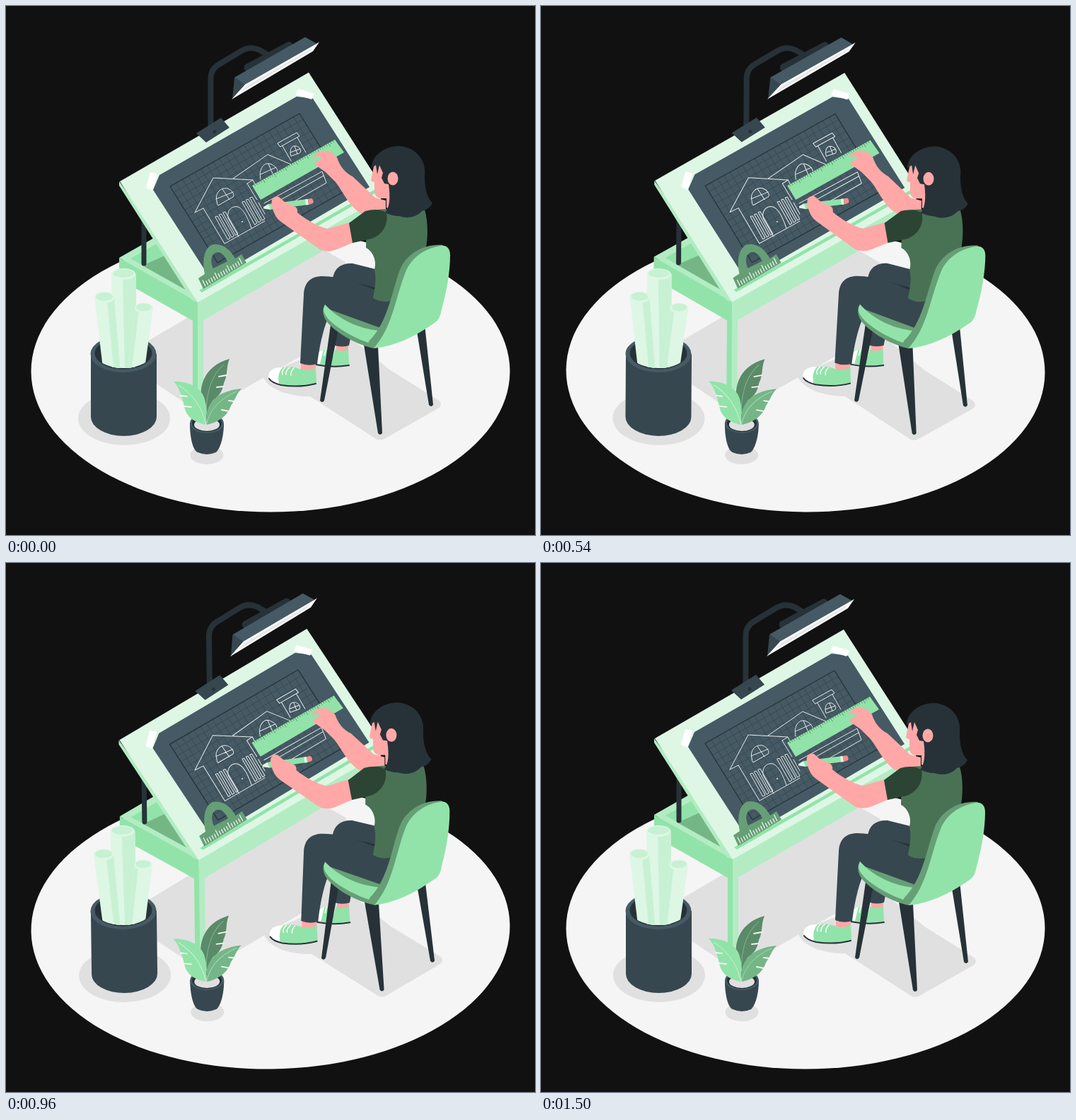
An HTML page with a canvas for the animation above (1.54 s loop, 748 px wide and 748 px high).

```html
<!DOCTYPE html>
<html lang="en">
<head>
<meta charset="utf-8">
<title>Architect at the drawing table</title>
<style>
html, body { margin: 0; width: 100%; height: 100%; overflow: hidden; background: #111; }
canvas { display: block; width: 100vw; height: 100vh; }
</style>
</head>
<body>
<canvas id="stage" width="748" height="748"></canvas>
<script>
const ctx = document.getElementById('stage').getContext('2d');
const LOOP = 1540, PERIOD = 1500, LEAD = 35;
const GREEN = '#92e3a9', PALE = '#def7e5', SOFT = '#b3ecc3', MINT = '#c8f1d4', MOSS = '#669f76', LEAF = '#75b687';
const INK = '#263238', SLATE = '#37474f', STEEL = '#455a64';
const FLOOR = '#f5f5f5', SHADE = '#e0e0e0', SKIN = '#ffa8a7', SHIRT = '#497255', SLEEVE = '#2c4433';

function fill(color, d) {
  ctx.fillStyle = color;
  ctx.fill(new Path2D(d), 'evenodd');
}

function line(color, width, d) {
  ctx.strokeStyle = color;
  ctx.lineWidth = width;
  ctx.stroke(new Path2D(d));
}

function oval(color, x, y, rx, ry) {
  ctx.fillStyle = color;
  ctx.beginPath();
  ctx.ellipse(x, y, rx, ry, 0, 0, 7);
  ctx.fill();
}

function sway(cx, cy, angle, draw) {
  ctx.save();
  ctx.translate(cx, cy);
  ctx.rotate(angle);
  ctx.translate(-cx, -cy);
  draw();
  ctx.restore();
}

// Rocks 0 -> 1 -> -1 -> 0 degrees at constant speed.
function wind(ms) {
  const q = (ms % PERIOD) / (PERIOD / 4);
  return q < 1 ? q : q < 3 ? 2 - q : q - 4;
}

function lamp() {
  line(INK, 8, 'M289.5 172V103Q289.5 89 302 82L332 64Q345 56 358 62L370 69');
  line(INK, 11, 'M342 87L400 56');
  fill(STEEL, 'M323 101L423 44L439 53L338 112Z');
  fill(SLATE, 'M323 101L338 111L320 132Z');
  fill('#fff', 'M338 111L443 51L434 64L319 132Z');
  fill('#e6e6e6', 'M340 113L434 59L428 65L330 123Z');
  fill(SLATE, 'M269 180L304 158L316 172L283 193Z');
  oval(INK, 295, 178, 2.4, 2.4);
}

function sheet() {
  fill(STEEL, 'M217 239L411 128L434 131L514 256L290 387L208 260Z');
  fill('#fff', 'M413 117L436 124L432 132L409 125Z');
  fill('#fff', 'M204 235L214 237L207 261L198 257Z');
  const at = (u, v) => `${232 + 183 * u + 67 * v} ${255 - 103 * u + 108 * v}`;
  let grid = '';
  for (let i = 1; i < 21; i++) grid += `M${at(i / 21, 0)}L${at(i / 21, 1)}`;
  for (let i = 1; i < 13; i++) grid += `M${at(0, i / 13)}L${at(1, i / 13)}`;
  line('#37474f', 0.8, grid);
  line(INK, 1.3, `M${at(0, 0)}L${at(1, 0)}L${at(1, 1)}L${at(0, 1)}Z`);
}

function house() {
  const chalk = d => line('#e6eaec', 1, d);
  chalk('M267 292L293 243L349 246L341 251M267 292L279 286M279 286L309 336L366 304M341 251L355 274');
  chalk('M321 244L370 210L408 226M349 246L361 270');
  // Round window, door and shutters
  chalk('M298 276C295 264 304 256 313 258C320 260 324 268 321 270L300 282Q298 280 298 276M306 259L316 274M297 273L321 263');
  chalk('M329 326L314 300C312 288 320 282 328 284C334 286 341 296 347 314');
  oval('#e6eaec', 334, 305, 1, 1);
  for (let i = 0; i < 3; i++) {
    const x = 296 + 5.5 * i, y = 298 - 3 * i;
    chalk(`M${x} ${y}l3 -1l18 31l-3 2Z`);
    chalk(`M${x + 38} ${y - 21}l3 -1l18 31l-3 2Z`);
  }
  // Rear wing
  chalk('M360 245C357 231 364 221 373 223C379 225 383 229 384 233M371 223L377 237M360 238L382 228');
  chalk('M384 194L411 179L415 184L388 199ZM391 198L403 219M412 186L424 207');
  chalk('M403 212C400 203 404 197 410 198C416 199 419 207 415 208ZM408 198L412 209M402 207L416 202');
  chalk('M357 278L366 294M365 279L447 234L453 250L387 288M369 285L449 240');
}

function ruler() {
  fill(GREEN, 'M348 254L465 189L478 207L360 274Z');
  let ticks = '';
  for (let i = 1; i < 38; i++) {
    const u = i / 38, size = i % 5 ? 2.5 : 5;
    ticks += `M${348 + 117 * u} ${254 - 65 * u}l${size * .55} ${size * .85}`;
  }
  line('#49805a', 0.8, ticks);
}

function protractor() {
  fill(MOSS, 'M272 385L281 379C276 354 283 337 296 337C309 337 318 346 324 357L333 351L340 363L279 400ZM293 371L313 361C309 351 302 346 296 349C289 353 289 362 293 371Z');
  let ticks = '';
  for (let i = 0; i < 16; i++) {
    const size = i % 5 ? 5 : 8;
    ticks += `M${282 + 3.45 * i} ${396 - 2.1 * i}l${-size * .5} ${-size}`;
  }
  line('#fff', 1.1, ticks);
}

function table() {
  fill(SHADE, 'M166 503Q163 497 171 491L263 437L450 345L480 362V459L285 571Q276 576 266 570Z');
  fill(GREEN, 'M264 430H272V546L264 541Z');
  fill(SOFT, 'M271 430H279V540L271 546Z');
  fill(SOFT, 'M160 356L225 319L300 400L271 420Z');
  fill(GREEN, 'M176 357L222 331L264 407Z');
  fill(LEAF, 'M193 367L238 347L266 408Z');
  line(INK, 7, 'M195 300V364');
  fill(GREEN, 'M160 356L271 419V449L160 386Z');
  fill(SOFT, 'M271 419L530 270V299L271 449Z');
  fill(SOFT, 'M160 248V254L263 416L271 419L276 410Z');
  fill(PALE, 'M161 248L428 94L534 259V269L271 419Z');
  fill(GREEN, 'M273 402L526 257L528 261L277 405Z');
  lamp();
  sheet();
  house();
  ruler();
  protractor();
}

function shoe(d, toe, sole, laces) {
  fill(GREEN, d);
  fill('#fff', toe);
  line(INK, 2, sole);
  line('#fff', 1.5, laces);
}

function legs() {
  fill(SKIN, 'M467 478H484V490Q475 492 467 488Z');
  fill(SLATE, 'M460 450L489 460L485 480Q475 483 465 480Z');
  shoe('M438 497Q440 486 450 486L466 486Q476 490 484 485L485 507Q462 512 438 505Z',
    'M438 505Q438 488 449 486L444 506Z', 'M438 507Q462 512 485 508', 'M452 486l-2 8M458 486l-2 9M464 487l-2 8');
  fill(SLATE, 'M462 385C464 371 474 363 490 364L526 373L530 408L466 392Z');
  fill(INK, 'M462 383Q490 390 522 398L523 404Q495 392 462 386Z');
  fill(SKIN, 'M417 502H438V516Q427 521 417 515Z');
  fill(SLATE, 'M416 505L421 408C422 391 430 383 446 382C474 382 499 392 521 401L545 415L532 462L455 442C448 459 443 482 440 506Q428 510 416 505Z');
  shoe('M371 523C373 512 383 511 394 511C404 509 411 512 418 514Q430 517 438 511L439 533C423 539 404 539 389 535Q370 531 371 523Z',
    'M371 522C373 512 383 511 391 511Q383 519 386 534Q370 530 371 522Z',
    'M372 527Q376 533 389 536Q415 540 438 534', 'M395 511q-6 5 -4 10M401 511q-6 5 -5 10M407 512q-5 5 -4 10');
}

function body() {
  // Arm on the ruler
  fill(SKIN, 'M434 214L440 207Q449 203 459 206L468 214C472 227 480 236 490 241L522 271L537 275V290Q518 298 502 293C486 285 477 263 466 249L452 235L438 225Q434 222 440 219L446 217L443 212Z');
  fill(SHIRT, 'M510 291Q536 284 556 290L592 288C597 304 597 330 593 346L562 385L545 417Q530 420 519 413C522 396 524 386 521 373C525 360 518 346 509 342Z');
  // Drawing hand with pencil
  fill(GREEN, 'M371 280L426 273L427 281L373 288Z');
  fill(PALE, 'M361 286L371 280L374 288Z');
  oval(INK, 363, 285.5, 1.3, 1.1);
  fill(PALE, 'M423 273.4L427 273L428 281L424 281.5Z');
  fill('#f28f8f', 'M427 273L432 272Q436 275 434 279L428 281Z');
  fill(SKIN, 'M376 282C374 273 379 268 386 270L394 277L407 283Q413 285 412 292C424 302 439 311 455 315L489 305L492 334L468 344Q454 350 442 343L390 306Q379 299 376 282Z');
  fill(SLEEVE, 'M485 307L508 290C519 287 531 287 538 293C541 308 533 323 517 329L490 335Z');
}

function head() {
  fill(SKIN, 'M521 222L516 246Q517 249 521 249L521 264Q523 273 533 272L538 272V285L560 296L565 220Z');
  fill(INK, 'M517 229C517 211 536 198 556 198C580 200 595 218 592 241C592 260 596 271 603 279Q598 288 588 290C580 299 567 301 556 297Q546 297 536 292C542 286 544 272 541 252L535 251L531 243L533 236L528 225L525 238L523 225Z');
  oval(SKIN, 547, 244, 7.5, 9.5);
}

function chair() {
  fill(INK, 'M459 451L470 456L450 558Q447 562 444 558Z');
  fill(INK, 'M506 479L526 481L532 604Q529 608 526 604Z');
  fill(INK, 'M580 454L592 450L604 564Q601 568 598 564Z');
  fill(MOSS, 'M449 426Q446 436 454 447C471 466 500 480 520 484L535 468L529 455Z');
  fill(GREEN, 'M451 422C446 431 451 438 460 447C475 460 497 471 512 476Q521 470 527 459C498 456 470 443 451 422Z');
  fill(MOSS, 'M618 338C588 336 566 352 557 373C545 405 540 448 513 474L520 484L545 470L600 360Z');
  fill(GREEN, 'M628 352C628 342 622 338 615 339C590 343 573 357 565 376C550 414 547 453 520 484C550 481 577 468 606 448Q614 443 616 429C623 404 628 376 628 352Z');
}

function architect() {
  fill(SHADE, 'M363 522Q366 536 390 546Q413 553 430 552L520 610Q528 617 537 611L611 569Q619 563 611 557L542 514L489 470L450 455L417 500Z');
  legs();
  body();
  head();
  chair();
}

function roll(edge, face, x, y, rx, ry) {
  fill(PALE, edge);
  fill(MINT, face);
  oval(PALE, x, y, rx, ry);
  oval(MINT, x, y - 1, rx - 2, ry - 2);
}

function bucket() {
  oval(SHADE, 167, 583, 65, 38);
  fill(SLATE, 'M120 492V581A46.5 27 0 0 0 213 581V492Z');
  oval(STEEL, 166, 492, 46.5, 26);
  oval(INK, 166, 491, 40.5, 22.5);
  ctx.save();
  const mouth = new Path2D();
  mouth.rect(100, 350, 140, 141);
  mouth.ellipse(166, 491, 40, 21, 0, 0, 7);
  ctx.clip(mouth);
  roll('M149 379H184L183 520H150Z', 'M165 386L184 379V520H168Z', 166, 379, 17, 8);
  roll('M125 412H153L162 520H138Z', 'M143 418L153 412L162 520H153Z', 139, 412, 14, 8);
  roll('M183 427H208L195 520H171Z', 'M183 427L188 431L177 520H171Z', 195, 427, 13, 7.5);
  ctx.restore();
}

function leaf(color, outline, vein, veinColor, slits) {
  fill(color, outline);
  line(veinColor, 1, vein);
  line(FLOOR, 1.8, slits);
}

function plant() {
  oval(SHADE, 284, 635, 23.5, 13);
  fill(SLATE, 'M260 590C260 612 265 629 271 631Q284 637 297 631C303 626 308 609 308 590Z');
  oval(STEEL, 284, 590, 24, 14);
  oval(INK, 284, 590, 21, 12);
  oval(SHADE, 284, 592, 18, 9);
  leaf('#5a8a68', 'M279 572C270 543 277 510 316 499C311 510 314 522 308 533C306 547 299 553 292 558L286 577Z',
    'M308 507Q284 527 283 574', '#86b594', 'M312 522L301 524M308 538L298 539');
  leaf(GREEN, 'M282 592C264 588 256 580 253 570C249 552 244 537 237 531C258 530 277 540 281 556Q286 574 282 592Z',
    'M244 536Q275 556 282 590', MINT, 'M247 551L256 552M252 566L262 567');
  leaf(LEAF, 'M284 592C280 568 292 545 333 541C326 548 324 557 318 565C314 579 300 589 284 592Z',
    'M326 545Q291 560 284 590', '#a8d3b5', 'M323 559L315 558M315 573L305 571');
}

function render(now) {
  const t = Math.min(now % LOOP, PERIOD);
  const angle = (wind(t + LEAD) - wind(LEAD)) * Math.PI / 180;
  ctx.fillStyle = '#111';
  ctx.fillRect(0, 0, 748, 748);
  ctx.lineCap = ctx.lineJoin = 'round';
  sway(374, 517, angle, () => oval(FLOOR, 374, 516.5, 338.5, 199));
  sway(342, 295, angle, table);
  sway(497, 406, angle, architect);
  sway(167, 496, angle, bucket);
  sway(285, 573, angle, plant);
}

let start;
function tick(now) {
  start ??= now;
  render(now - start);
  requestAnimationFrame(tick);
}
render(0);
requestAnimationFrame(tick);
</script>
</body>
</html>
```
